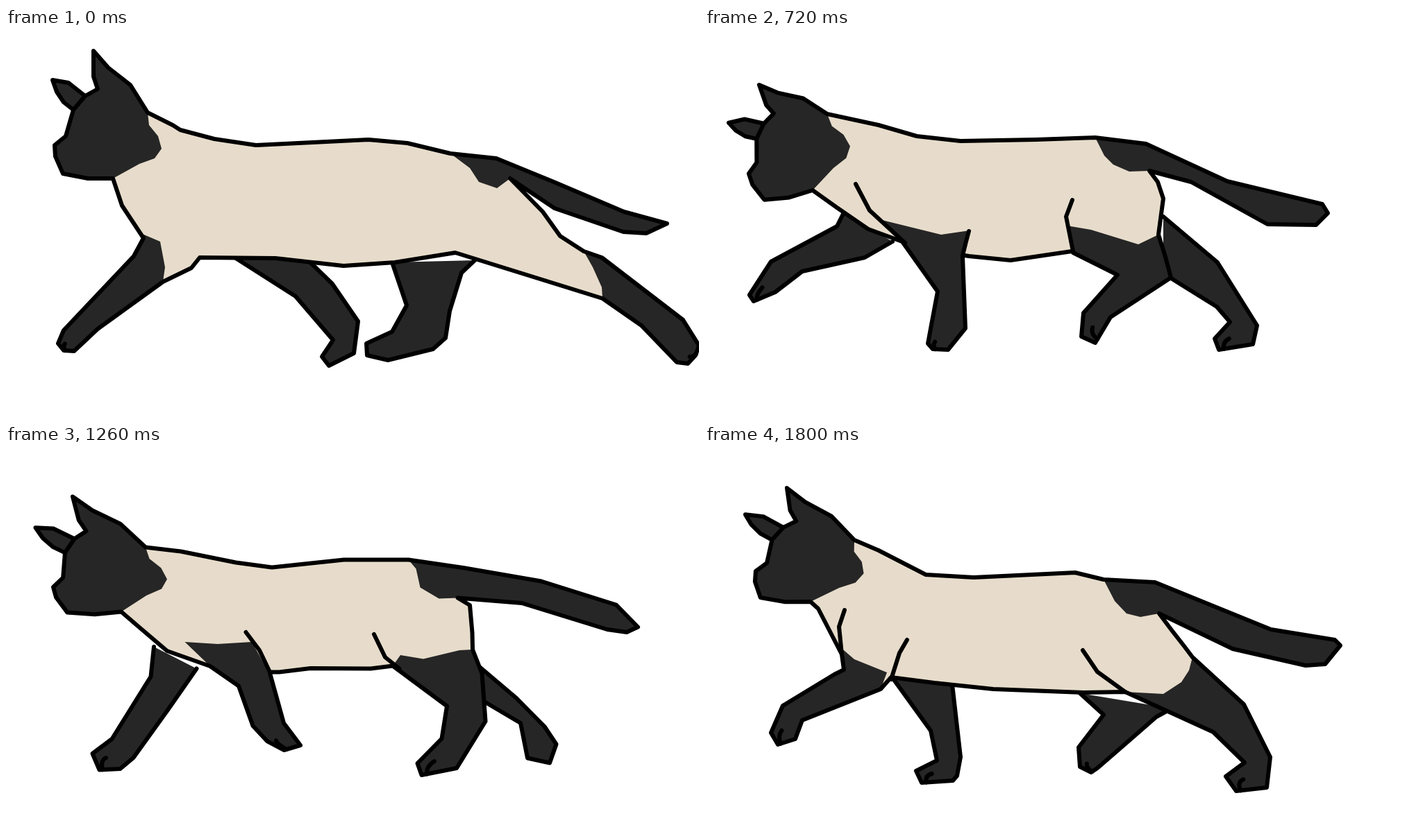
An HTML page with a canvas that plays this animation: 998x561 px, repeating every 1980 ms.

```html
<!DOCTYPE html>
<html lang="en">
<head>
<meta charset="utf-8">
<title>Walking cat</title>
<style>
html, body { margin: 0; width: 100%; height: 100%; overflow: hidden; background: #fff; }
canvas { display: block; }
</style>
</head>
<body>
<canvas id="stage" width="998" height="561"></canvas>
<script>
const STEP = 180;
const INK = '#000', DARK = '#262626', CREAM = '#e7dccb';
const LINES = ['shoulder', 'elbow', 'thigh'];

const points = text => text.split(' ').map(p => p.split(',').map(Number));
const mix = (a, b, k = 0.5) => [a[0] + (b[0] - a[0]) * k, a[1] + (b[1] - a[1]) * k];
const mean = list => [0, 1].map(i => list.reduce((sum, p) => sum + p[i], 0) / list.length);

function pose(parts) {
  const out = { paws: parts.paws || 'fore hind farFore farHind' };
  for (const name in parts) if (name !== 'paws') out[name] = points(parts[name]);
  return out;
}

// Pose halfway between two others; reach lengthens the tail.
function between(a, b, reach = 0, change = {}) {
  const out = { paws: b.paws };
  for (const name in a) {
    if (name !== 'paws' && b[name]) out[name] = a[name].map((p, i) => mix(p, b[name][i]));
  }
  const root = out.tail[7][0], tip = out.tail[3][0];
  out.tail = out.tail.map(([x, y]) => [x + reach * (x - root) / (tip - root), y]);
  for (const name in change) out[name] = points(change[name]);
  return out;
}

// Affine map that carries triangle from onto triangle to.
function warp(from, to) {
  const [o, u, v] = from, [O, U, V] = to;
  const ux = u[0] - o[0], uy = u[1] - o[1], vx = v[0] - o[0], vy = v[1] - o[1];
  const det = ux * vy - vx * uy;
  return ([x, y]) => {
    const dx = x - o[0], dy = y - o[1];
    const a = (dx * vy - vx * dy) / det, b = (ux * dy - dx * uy) / det;
    return [0, 1].map(i => O[i] + a * (U[i] - O[i]) + b * (V[i] - O[i]));
  };
}

// The head is one drawing, fitted to ear tip, nape, nose and throat.
const [EAR, NAPE, NOSE, THROAT] = points('126,33 204,122 70,169 154,217');
const JAW = points('118,217 82,210 71,185');
const SKULL = points('70,169 86,156 97,118 114,98 132,88 126,70 126,33 147,57 179,82 204,122');
const FAR_EAR = points('114,98 90,79 67,75 73,92 83,107 97,118');
const NECK = points('206,140 219,156 224,174 214,188 192,196');

function fitHead([ear, nape, nose, throat]) {
  const upper = warp([NOSE, EAR, NAPE], [nose, ear, nape]);
  const lower = warp([NOSE, THROAT, NAPE], [nose, throat, nape]);
  return {
    outline: [throat, ...JAW.map(lower), ...SKULL.map(upper)],
    neck: NECK.map(lower),
    farEar: FAR_EAR.map(upper)
  };
}

const reach = pose({
  paws: 'fore hind',
  head: '126,33 204,122 70,169 154,217',
  back: '240,140 251,147 300,160 360,169 522,161 578,166 640,181',
  tail: '706,188 789,222 890,265 952,282 922,296 889,294 790,260 726,217',
  tailMark: '668,202 681,222 707,231',
  hind: '773,265 798,300 832,322 858,331 975,421 998,458 993,472 982,484 966,482 915,429 859,390',
  hindMark: '858,374 845,345',
  belly: '647,324 560,338 486,343 388,332 279,331',
  fore: '267,346 226,366 132,434 98,466 83,465 75,455 83,436 184,329 198,303 167,256',
  foreMark: '194,296 222,308 229,345',
  farFore: '320,325 417,387 471,450 455,474 465,487 501,469 507,423 470,369 430,330',
  farHind: '675,335 656,353 639,408 633,447 615,463 550,479 520,472 519,455 556,438 577,400 556,338'
});

const land = pose({
  paws: 'fore farFore farHind',
  head: '118,38 192,114 64,167 149,220',
  back: '205,127 255,143 282,158 428,165 565,161 584,164',
  tail: '655,183 800,247 918,286 959,290 933,313 856,313 704,238 664,228',
  tailMark: '604,186 627,231 660,245',
  hind: '678,243 700,282 727,326 743,337 781,349 848,420 887,460 862,475 829,457 771,400 740,398',
  hindMark: '739,370',
  belly: '612,386 580,363 495,362 320,333 263,340',
  fore: '249,362 230,382 136,470 125,483 75,479 69,466 120,447 184,343 183,286 160,230',
  foreMark: '204,304 214,327 228,365',
  farFore: '263,344 323,430 363,455 416,466 424,460 424,449 381,432 351,373 345,335',
  farHind: '664,395 660,436 598,481 573,505 526,496 528,481 542,468 566,464 592,423 541,366'
});

const stand = pose({
  head: '109,49 198,117 68,178 147,222',
  back: '278,156 348,175 460,176 578,154 608,156',
  tail: '687,177 776,232 890,282 929,298 900,317 874,318 760,265 667,200',
  tailMark: '634,196 653,205 660,203',
  hind: '686,218 690,250 690,272 718,263 735,277 727,370 743,422 710,441 690,412 679,375 677,336',
  hindMark: '664,345 657,310 670,268',
  belly: '633,349 595,344 480,336',
  fore: '320,321 302,370 262,448 253,474 218,484 198,470 205,457 257,380 259,326 205,268 170,239',
  foreMark: '270,332 288,341 298,358',
  farFore: '342,324 324,370 322,406 360,420 363,446 320,443 285,432 279,424 300,330',
  farHind: '690,345 708,440 704,470 700,479 650,478 648,468 674,449 680,412 597,346',
  elbow: '315,301 318,311 322,321',
  thigh: '550,274 563,304 595,344'
});

const swing = pose({
  head: '78,82 176,124 63,210 155,234',
  back: '250,140 305,156 368,163 476,161 562,158',
  tail: '635,167 752,221 889,254 897,267 880,284 810,283 700,222 640,206',
  tailMark: '575,184 588,197 611,207',
  hind: '652,222 660,246 653,298 663,330 671,360 584,417 562,454 542,445 545,411 594,356 530,324',
  hindMark: '521,285 556,291 624,312',
  belly: '528,322 440,335 380,329',
  fore: '374,328 371,330 375,433 350,464 328,463 321,455 326,428 335,380 284,308 235,290 190,259',
  foreMark: '255,277 340,298 381,292',
  farFore: '270,308 230,331 140,351 101,381 70,394 64,385 95,337 190,286 200,266',
  farHind: '660,272 738,338 795,429 789,456 740,464 734,448 756,424 737,402 660,354',
  shoulder: '217,225 237,263 288,310',
  elbow: '380,293 376,308 371,328',
  thigh: '529,248 520,272 530,322'
});

const stride = pose({
  head: '98,73 199,149 68,213 165,244',
  back: '272,147 357,166 396,167 445,157 592,153',
  tail: '704,164 800,190 886,228 920,262 906,268 875,261 740,215 667,208',
  tailMark: '603,168 606,192 637,207',
  hind: '679,222 681,242 675,265 672,311 686,357 606,452 549,466 542,448 588,412 615,365 558,303',
  hindMark: '584,284 615,290 642,269',
  belly: '545,307 480,318 440,322',
  fore: '432,322 436,329 476,412 470,458 438,456 432,430 424,405 390,360 353,321 255,311 193,268',
  foreMark: '308,290 355,297 400,289',
  farFore: '265,305 186,380 130,443 110,464 72,467 66,438 93,420 180,308 190,266',
  farHind: '683,233 820,318 899,380 921,421 921,453 880,457 870,420 819,375 675,330',
  shoulder: '229,242 268,273 345,307',
  elbow: '388,277 405,290 432,322',
  thigh: '540,273 547,292 558,303'
});

const gather = pose({
  paws: 'fore hind farFore',
  head: '94,76 203,146 68,197 167,237',
  back: '232,160 305,173 370,186 528,174 567,178',
  tail: '612,190 740,203 868,233 896,263 878,272 853,271 744,241 634,233',
  tailMark: '578,189 587,219 610,236',
  hind: '657,240 662,300 669,325 699,348 695,440 692,480 648,486 643,470 667,435 655,388 556,334',
  hindMark: '552,322 587,327 664,323',
  belly: '505,338 397,326 347,333',
  fore: '328,333 326,336 324,390 378,408 363,424 320,424 287,405 280,335 235,317 209,283 190,257',
  foreMark: '207,278 255,277 308,279',
  farFore: '284,340 283,380 237,459 219,470 197,470 183,452 212,428 237,360 236,316',
  farHind: '655,385 650,412 652,432 664,442 645,464 622,446 612,382 560,366 522,338',
  elbow: '303,263 325,302 328,333',
  thigh: '520,273 545,320 575,342'
});

const pass = pose({
  head: '118,62 215,137 73,182 152,226',
  back: '250,152 318,187 387,191 533,184 574,194',
  tail: '648,198 815,266 907,281 915,289 893,316 865,318 760,294 654,243',
  tailMark: '590,225 607,243 627,248',
  hind: '672,267 690,290 702,306 776,374 814,450 809,494 765,499 750,478 777,458 732,414 605,356',
  hindMark: '660,359 686,342 697,325',
  belly: '545,357 415,352 330,343',
  fore: '268,335 253,352 140,397 130,424 105,432 95,415 112,376 186,331 200,324 197,302 163,236',
  foreMark: '193,290 215,309 262,328',
  farFore: '356,345 368,450 363,477 357,484 312,487 304,470 334,455 325,412 268,333',
  farHind: '672,380 650,392 595,440 565,466 556,472 540,464 538,436 574,389 540,358',
  shoulder: '201,238 193,262 197,302',
  elbow: '291,281 280,300 268,338',
  thigh: '544,296 565,327 605,356'
});

const cycle = [
  reach, land, stand,
  between(stand, swing, 20, { head: '107,57 196,123 66,187 148,232' }),
  swing,
  between(swing, stride, 5, {
    farFore: '258,308 190,348 95,404 48,434 20,438 10,424 30,402 140,318 195,268'
  }),
  stride,
  between(stride, gather, 2),
  gather,
  between(gather, pass, -9),
  pass
];

const ctx = document.getElementById('stage').getContext('2d');

function trace(list) {
  ctx.beginPath();
  list.forEach(p => ctx.lineTo(...p));
}

function fill(list, color) {
  trace(list);
  ctx.fillStyle = color;
  ctx.fill();
}

function stroke(list, closed) {
  trace(list);
  if (closed) ctx.closePath();
  ctx.stroke();
}

function toe(leg, first) {
  const paw = leg.slice(first, first + 4);
  const from = mix(paw[1], paw[0], 0.15), to = mean(paw);
  ctx.beginPath();
  ctx.moveTo(...from);
  ctx.quadraticCurveTo(...mean([from, to, paw[2]]), ...to);
  ctx.stroke();
}

function draw(cat) {
  const head = fitHead(cat.head);
  const { back, tail, hind, belly, fore, paws } = cat;
  const body = [...head.outline, ...back, ...tail, ...hind, ...belly, ...fore];

  ctx.fillStyle = '#fff';
  ctx.fillRect(0, 0, 998, 561);
  ctx.strokeStyle = INK;
  ctx.lineWidth = 6;
  ctx.lineJoin = ctx.lineCap = 'round';

  for (const part of [head.farEar, cat.farFore, cat.farHind]) {
    fill(part, DARK);
    stroke(part);
  }
  for (const name of ['farFore', 'farHind']) {
    if (paws.includes(name)) toe(cat[name], 3);
  }

  fill(body, CREAM);
  fill([...head.outline, ...head.neck], DARK);
  fill([back[back.length - 1], ...tail, ...[...cat.tailMark].reverse()], DARK);
  fill([...hind.slice(2), ...cat.hindMark], DARK);
  fill([...fore.slice(1, 9), ...cat.foreMark], DARK);

  stroke(body, true);
  for (const name of LINES) if (cat[name]) stroke(cat[name]);
  const near = paws.split(' ');
  if (near.includes('fore')) toe(fore, 3);
  if (near.includes('hind')) toe(hind, 5);
}

const start = performance.now();
let shown = -1;

function tick() {
  const t = Math.max(0, performance.now() - start);
  const step = Math.floor(t / STEP) % cycle.length;
  if (step !== shown) draw(cycle[shown = step]);
  requestAnimationFrame(tick);
}
tick();
</script>
</body>
</html>
```
